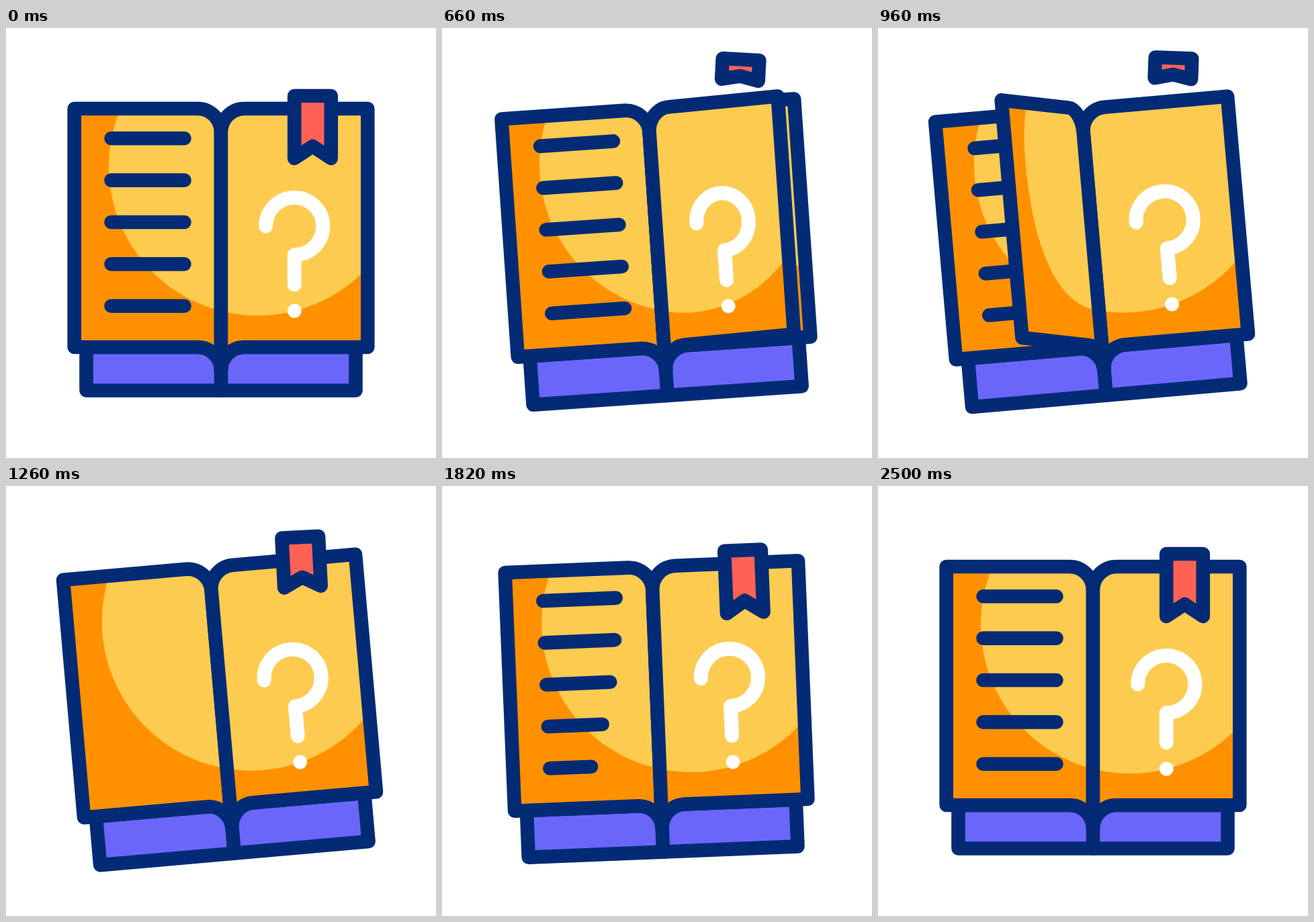
Recreate the animation shown at these times as an HTML page with a canvas. Size 640 by 640 pixels, loop 3000 ms.

```html
<!DOCTYPE html>
<html>
<head>
<meta charset="utf-8">
<title>Book</title>
<style>
html, body { margin: 0; width: 100%; height: 100%; overflow: hidden; background: #fff; }
canvas { display: block; width: 640px; height: 640px; }
</style>
</head>
<body>
<canvas id="stage"></canvas>
<script>
const LOOP = 3000;
const NAVY = '#032b75', YELLOW = '#fdcb50', ORANGE = '#ff9100';
const PURPLE = '#6a66fa', RED = '#ff6254', WHITE = '#fff';
const TURN_START = 540, TURN_END = 1190;

const canvas = document.getElementById('stage');
const ctx = canvas.getContext('2d');
const ratio = window.devicePixelRatio || 1;
canvas.width = canvas.height = 640 * ratio;

// Symmetric ease: cubic-bezier(k, 0, 1 - k, 1)
const easeInOut = k => x => {
  let lo = 0, hi = 1;
  for (let i = 0; i < 24; i++) {
    const u = (lo + hi) / 2, v = 1 - u;
    if (3 * v * v * u * k + 3 * v * u * u * (1 - k) + u * u * u < x) lo = u;
    else hi = u;
  }
  return lo * lo * (3 - 2 * lo);
};
const soft = easeInOut(0.5);
const strong = easeInOut(0.75);
const easeOut = x => 1 - (1 - x) ** 2;

const span = (t, from, to) => Math.min(1, Math.max(0, (t - from) / (to - from)));
const pulse = (t, ease, a, b, c, d) => ease(span(t, a, b)) - ease(span(t, c, d));

// Builds a path under a matrix, so that strokes keep their weight
function trace(matrix, build) {
  ctx.save();
  ctx.transform(...matrix);
  ctx.beginPath();
  build();
  ctx.restore();
}

function paint(fill, stroke, width = 20.6) {
  if (fill) {
    ctx.fillStyle = fill;
    ctx.fill();
  }
  if (stroke) {
    ctx.strokeStyle = stroke;
    ctx.lineWidth = width;
    ctx.stroke();
  }
}

function pagePath() {
  ctx.moveTo(0, -165);
  ctx.arcTo(0, -200, 35, -200, 35);
  ctx.lineTo(218.3, -200);
  ctx.lineTo(218.3, 155);
  ctx.lineTo(35, 155);
  ctx.arcTo(0, 155, 0, 190, 35);
  ctx.closePath();
}

// The back of a page bulges while it is raised
function glowPath(front, raised) {
  if (front) {
    ctx.arc(55, -114, 222, 0, Math.PI * 2);
    return;
  }
  ctx.moveTo(0, -336);
  ctx.arc(-55, -114, 222, -Math.PI / 2, 0);
  ctx.bezierCurveTo(167, -12.5 + 70 * raised, 98 + 32 * raised, 76 + 52 * raised, 0, 101);
  ctx.closePath();
}

function drawQuestion(w, rise) {
  const matrix = [w ** 0.8, 0, 0, 1, 0, -rise];
  trace(matrix, () => {
    ctx.arc(109.3, -25, 42.6, Math.PI, Math.PI * 2.5);
    ctx.lineTo(109.3, 62);
  });
  paint(null, WHITE, 21);
  trace(matrix, () => {
    ctx.moveTo(109.3, 101);
    ctx.lineTo(109.31, 101);
  });
  paint(null, WHITE, 21);
}

// w runs from 1 (lying right) to -1 (lying left)
function drawPage(w, rise = 0) {
  if (Math.abs(w) < 0.01) w = 0.01;
  const raised = 1 - Math.abs(w);
  const matrix = [w, -51 * raised / 218, 0, 1, 0, 0];
  trace(matrix, pagePath);
  ctx.save();
  ctx.clip();
  paint(ORANGE);
  trace(matrix, () => glowPath(w > 0, raised));
  paint(YELLOW);
  ctx.restore();
  if (w > 0) drawQuestion(w, rise);
  trace(matrix, pagePath);
  paint(null, NAVY);
}

function drawBase(drop) {
  ctx.beginPath();
  ctx.rect(-200.5, 155, 401, 64.5 + drop);
  paint(PURPLE, NAVY);
  ctx.beginPath();
  ctx.moveTo(0, 155);
  ctx.lineTo(0, 219.5 + drop);
  paint(null, NAVY);
}

function drawLines(t) {
  for (let i = 0; i < 5; i++) {
    const start = 1397 + 67.5 * i;
    const p = t < TURN_END ? 1 : easeOut(span(t, start, start + 450));
    if (p <= 0) continue;
    const y = -155.7 + 62.35 * i;
    ctx.beginPath();
    ctx.moveTo(-163.5, y);
    ctx.lineTo(-163.5 + 109 * p, y);
    paint(null, NAVY);
  }
}

function drawRibbon(p) {
  const s = 1 - 0.67 * p;
  ctx.save();
  ctx.translate(136.5 + 7 * p, -219 - 45 * p);
  ctx.rotate(7 * p * Math.PI / 180);
  trace([1, 0, 0, s, 0, 0], () => {
    ctx.moveTo(-27.3, 0);
    ctx.lineTo(27.3, 0);
    ctx.lineTo(27.3, 93);
    ctx.lineTo(0, 75);
    ctx.lineTo(-27.3, 93);
    ctx.closePath();
  });
  paint(RED, NAVY);
  ctx.restore();
}

function draw(t) {
  const tilt = -5.05 * pulse(t, strong, 0, 1115, 1115, 2500);
  const drop = 8 * pulse(t, soft, 275, 550, 1680, 2020);
  const ribbon = pulse(t, soft, 275, 550, 1050, 1400);
  const rise = 24 * pulse(t, soft, 1700, 2040, 2060, 2420);

  ctx.setTransform(ratio, 0, 0, ratio, 0, 0);
  ctx.fillStyle = WHITE;
  ctx.fillRect(0, 0, 640, 640);
  ctx.lineCap = ctx.lineJoin = 'round';
  ctx.translate(320, 320);
  ctx.rotate(tilt * Math.PI / 180);

  drawBase(drop);
  drawPage(-1);
  drawLines(t);
  drawPage(1, rise);
  if (t > TURN_START && t < TURN_END) {
    drawPage(1 - 2 * soft(span(t, TURN_START, TURN_END)));
  }
  drawRibbon(ribbon);
}

const begin = performance.now();
function tick() {
  draw((performance.now() - begin) % LOOP);
  requestAnimationFrame(tick);
}
tick();
</script>
</body>
</html>
```
